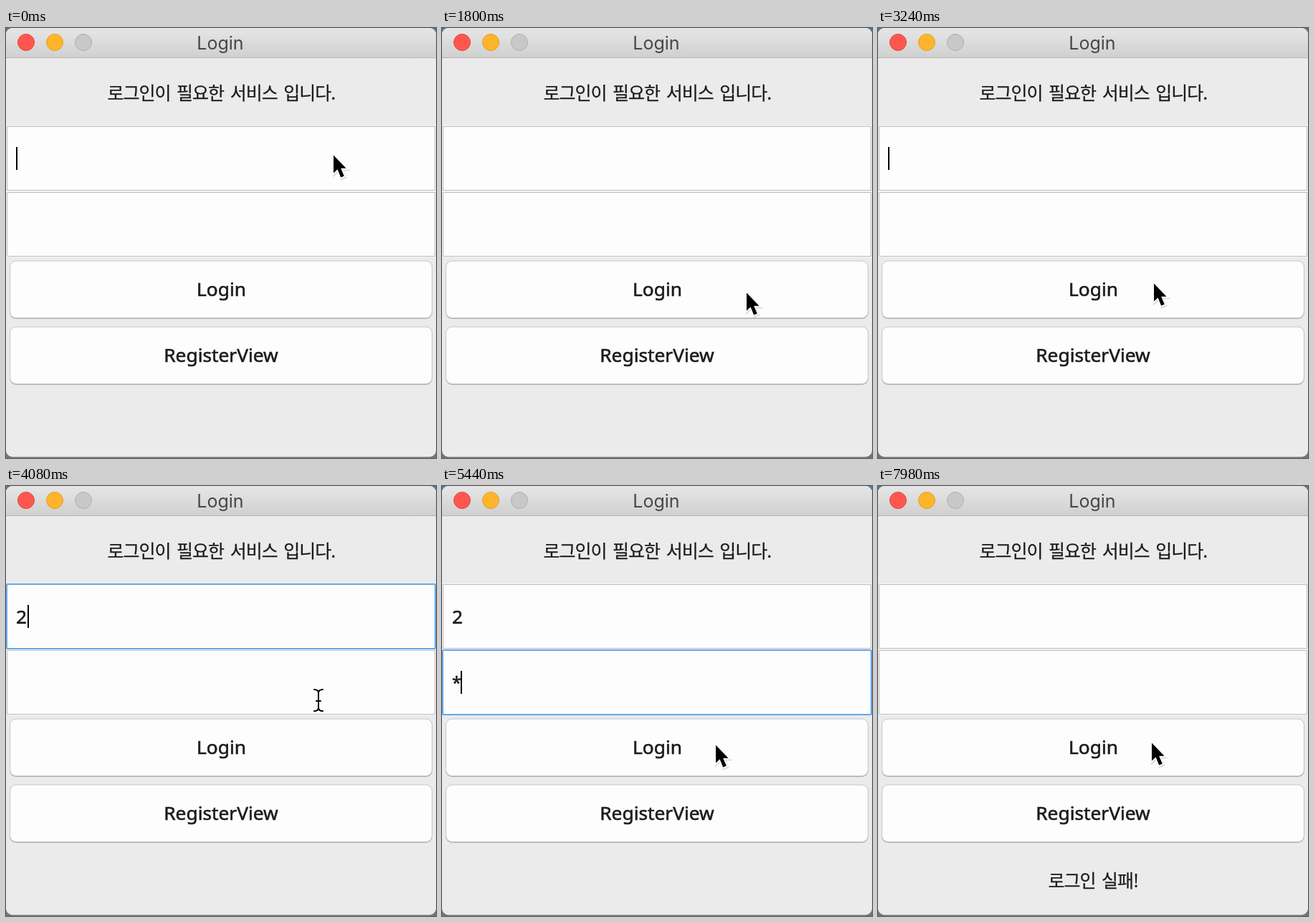
Animation, 600 px wide and 600 px high, one loop 8000 ms. Source, as an HTML page:

```html
<!DOCTYPE html>
<html lang="ko">
<head>
<meta charset="utf-8">
<title>Login</title>
<style>
  html, body { margin: 0; width: 100%; height: 100%; overflow: hidden; background: #747474; }
  svg { display: block; width: 100vw; height: 100vh; }
  text { fill: #1c1c1c; }
  .ui { font: 400 26.3px "Noto Sans", sans-serif; stroke: #1c1c1c; stroke-width: .6; }
  .ko { font: 400 25px "Noto Sans CJK KR", "Noto Sans CJK", sans-serif; letter-spacing: -1px; word-spacing: 2.6px; stroke: #1c1c1c; stroke-width: .25; }
  .title { font: 400 25px Inter, sans-serif; fill: #474747; }
  .mid { text-anchor: middle; }
  .box { fill: #fdfdfd; stroke: #bdbdbd; stroke-width: 1; }
  .focus { fill: none; stroke: #62a8ea; stroke-width: 2; }
  .btn { fill: #fdfdfd; stroke: #c6c6c6; stroke-width: 1; }
  .shade { fill: #b4b4b4; }
</style>
</head>
<body>
<svg viewBox="0 0 600 600">
  <defs>
    <linearGradient id="bar" x2="0" y2="1">
      <stop offset="0" stop-color="#e6e6e6"/>
      <stop offset="1" stop-color="#d0d0d0"/>
    </linearGradient>
    <clipPath id="win"><rect width="600" height="598.5" rx="9"/></clipPath>
    <path id="arrowShape" d="M0 0V25L5.6 19.8 10.2 31 14.8 29 10.2 18.2H17.6Z"/>
    <path id="beamShape" d="M-6-15Q0-15 0-10V10Q0 15-6 15M6-15Q0-15 0-10M0 10Q0 15 6 15M-3 1H3"/>
  </defs>
  <rect width="600" height="300" fill="#5b7894"/>
  <rect y="300" width="600" height="300" fill="#747474"/>
  <g clip-path="url(#win)">
    <rect width="600" height="600" fill="#ebebeb"/>
    <rect width="600" height="41" fill="url(#bar)"/>
    <rect y="41" width="600" height="1" fill="#b4b4b4"/>
  </g>
  <circle cx="28" cy="20" r="11.5" fill="#ff5750" stroke="#e0473f"/>
  <circle cx="68" cy="20" r="11.5" fill="#ffb52b" stroke="#e09f28"/>
  <circle cx="108" cy="20" r="11.5" fill="#c8c8c8" stroke="#b0b0b0"/>
  <text class="title mid" x="299" y="30">Login</text>
  <text class="ko" x="141.5" y="100">로그인이 필요한 서비스 입니다.</text>

  <rect y="136" width="600" height="184" fill="#f6f6f6"/>
  <rect class="box" x="1.5" y="137.5" width="597" height="89"/>
  <rect class="box" x="1.5" y="229.5" width="597" height="89"/>
  <rect class="focus" id="focus1" x="1" y="137" width="598" height="90" rx="1"/>
  <rect class="focus" id="focus2" x="1" y="229" width="598" height="90" rx="1"/>
  <text class="ui" id="user" x="14" y="192">2</text>
  <text class="ui" id="pass" x="14" y="283" style="font-size:23px">*</text>
  <rect id="caret" width="2" height="32" fill="#000"/>

  <rect class="shade" x="5" y="326" width="590" height="80" rx="9"/>
  <rect class="btn" x="5.5" y="325" width="589" height="79.5" rx="8.5"/>
  <rect id="pressed" x="5" y="325" width="590" height="80" rx="8" fill="#ebebeb" stroke="#62a8ea" stroke-width="2.5"/>
  <text class="ui mid" x="300.5" y="374">Login</text>
  <rect class="shade" x="5" y="418" width="590" height="80" rx="9"/>
  <rect class="btn" x="5.5" y="417" width="589" height="79.5" rx="8.5"/>
  <text class="ui mid" x="300" y="466">RegisterView</text>
  <text class="ko" id="fail" x="237.5" y="560">로그인 실패!</text>

  <g id="arrow">
    <use href="#arrowShape" x="1" y="3" fill="none" stroke="#888" stroke-opacity=".3" stroke-width="4"/>
    <use href="#arrowShape" y="1.5" stroke="#fff" stroke-width="3.4" paint-order="stroke"/>
  </g>
  <g id="beam" fill="none" stroke-linecap="round">
    <use href="#beamShape" stroke="#fff" stroke-width="4"/>
    <use href="#beamShape" stroke="#000" stroke-width="2"/>
  </g>
</svg>
<script>
const LOOP = 8000;
const FOCUS_USER = 3540, TYPE_USER = 3840;
const FOCUS_PASS = 4460, TYPE_PASS = 4960;
const PRESS = 6480, RELEASE = 6580;

// Pointer stops: time, x, y
const stops = [
  [0, 457, 176], [400, 457, 176], [1400, 425, 368], [2100, 425, 368],
  [2800, 385, 355], [3250, 385, 355], [3500, 428, 195], [3800, 428, 195],
  [4080, 436, 299], [4180, 436, 299], [4400, 436, 282], [4850, 436, 282],
  [5300, 382, 360], [5800, 382, 360], [6100, 382, 357], [LOOP, 382, 357]
];

const el = id => document.getElementById(id);
const show = (id, on) => el(id).setAttribute("visibility", on ? "visible" : "hidden");
const during = (t, a, b) => t >= a && t < b;
const ease = u => u * u * (3 - 2 * u);

function pointer(t) {
  const i = stops.findIndex(s => s[0] > t);
  const [t0, x0, y0] = stops[i - 1], [t1, x1, y1] = stops[i];
  const u = ease((t - t0) / (t1 - t0));
  return [x0 + (x1 - x0) * u, y0 + (y1 - y0) * u];
}

// The blink restarts whenever the caret moves
function caretState(t) {
  const moves = [[-100, 14, 166], [FOCUS_USER, 14, 166], [TYPE_USER, 30, 166],
                 [FOCUS_PASS, 14, 258], [TYPE_PASS, 26, 258]];
  const [start, x, y] = moves.filter(m => m[0] <= t).pop();
  return { x, y, on: t < PRESS && (t - start) % 1000 < 500 };
}

function draw(t) {
  show("focus1", during(t, FOCUS_USER, FOCUS_PASS));
  show("focus2", during(t, FOCUS_PASS, PRESS));
  show("user", during(t, TYPE_USER, RELEASE));
  show("pass", during(t, TYPE_PASS, RELEASE));
  show("pressed", during(t, PRESS, RELEASE));
  show("fail", t >= RELEASE);

  const c = caretState(t);
  el("caret").setAttribute("x", c.x);
  el("caret").setAttribute("y", c.y);
  show("caret", c.on);

  const [x, y] = pointer(t);
  const overField = t > 3250 && y > 137 && y < 319;
  for (const id of ["arrow", "beam"]) el(id).setAttribute("transform", `translate(${x} ${y})`);
  show("arrow", !overField);
  show("beam", overField);
}

const begin = performance.now();
function tick() {
  draw((performance.now() - begin) % LOOP);
  requestAnimationFrame(tick);
}
tick();
</script>
</body>
</html>
```
